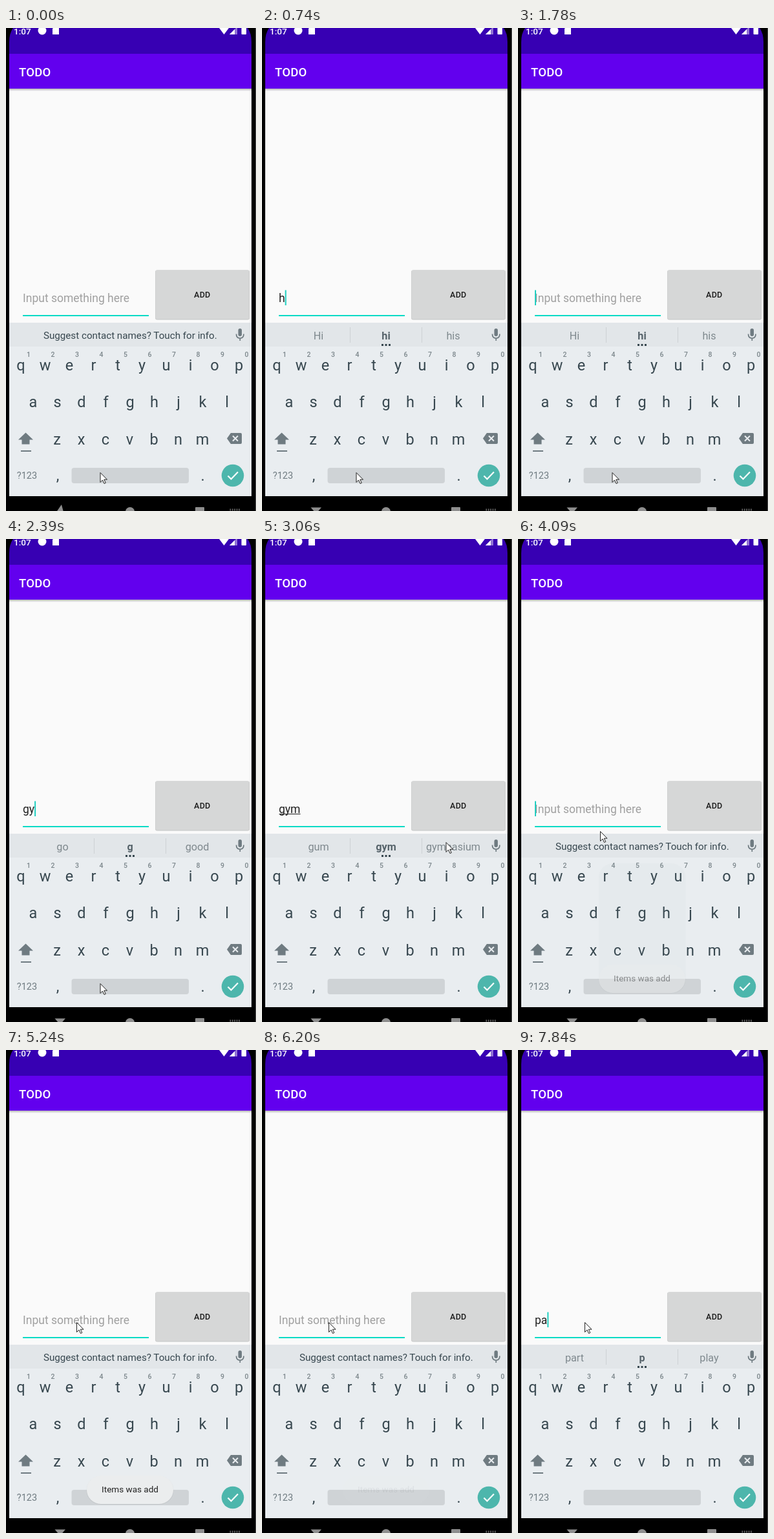
An HTML page for the animation above (7990 ms loop, 387 by 749 pixels).

```html
<!DOCTYPE html>
<html lang="en">
<head>
<meta charset="utf-8">
<title>Todo app</title>
<style>
  html, body { margin: 0; width: 100%; height: 100%; overflow: hidden; background: #000; }
  svg { display: block; width: 100%; height: 100%; font-family: Roboto, sans-serif; }
  text { white-space: pre; }
  .mid { text-anchor: middle; }
  .key { font-size: 23.5px; fill: #37474f; }
  .num { font-size: 10.5px; font-weight: 500; fill: #7b868b; }
  .field { font-size: 17.5px; fill: #212121; }
  .word { font-size: 16.2px; fill: #7f898e; }
  .bold { font-weight: 700; fill: #56636a; }
  .grey { fill: #6f7b81; }
</style>
</head>
<body>
<svg viewBox="0 0 387 749" preserveAspectRatio="none">
  <defs>
    <linearGradient id="shade" x2="0" y2="1">
      <stop offset="0" stop-opacity=".28"/>
      <stop offset="1" stop-opacity="0"/>
    </linearGradient>
    <clipPath id="screen"><path d="M5 727V22Q5 8 11 0H374Q380 8 380 22V727Z"/></clipPath>
  </defs>
  <rect width="387" height="749"/>
  <rect x="386" width="1" height="749" fill="#444"/>

  <g clip-path="url(#screen)">
    <rect x="5" y="94" width="375" height="364" fill="#fafafa"/>
    <rect width="387" height="40" fill="#3700b3"/>
    <rect y="40" width="387" height="54" fill="#6200ee"/>
    <rect y="94" width="387" height="4" fill="url(#shade)"/>
    <rect y="457" width="387" height="37" fill="#e2e6e9"/>
    <rect y="494" width="387" height="232" fill="#e9edf0"/>
  </g>

  <g fill="#fff">
    <text x="12" y="10" font-size="13.5" font-weight="500">1:07</text>
    <circle cx="56" cy="4" r="6.5"/>
    <path d="M72 10V1L75-2H82V10Z"/>
    <path d="M330 0Q338-6 345 0L337.5 10Z"/>
    <path d="M346 10L358-2V10Z" opacity=".45"/>
    <path d="M346 10L354 2V10Z"/>
    <rect x="364.500" y="-2" width="7.500" height="12" rx="1"/>
    <text x="20" y="74.500" font-size="18.500" font-weight="500" letter-spacing=".2">TODO</text>
  </g>

  <rect id="lift" x="231" y="376" width="146" height="79" rx="3" opacity="0"/>
  <rect x="231" y="375.500" width="146" height="77" rx="3" fill="#c6c7c7"/>
  <rect id="button" x="231.500" y="375.500" width="145" height="76" rx="2" fill="#d6d7d7"/>
  <text class="mid" x="303.800" y="418" font-size="12.500" font-weight="500" letter-spacing=".3" fill="#1c1c1c">ADD</text>

  <text id="hint" class="field" x="26" y="425" style="fill:#a0a0a0">Input something here</text>
  <text id="typed" class="field" x="26" y="425"></text>
  <rect id="line" x="26.500" y="426" width="33" height="1" fill="#212121"/>
  <rect x="26" y="445" width="195" height="2" fill="#03dac5"/>
  <rect id="caret" y="406.500" width="2" height="23.500" fill="#1fcfc0"/>

  <text id="contact" class="mid" x="192.300" y="482" font-size="15.200" fill="#37474f">Suggest contact names? Touch for info.</text>
  <g id="words" class="mid">
    <path d="M136.500 464V488M247.500 464V488" stroke="#cdd2d5"/>
    <text class="word" x="87.500" y="483"></text>
    <text class="word bold" x="192" y="483"></text>
    <text class="word" x="296" y="483"></text>
    <path d="M185 491.500H199" stroke="#37474f" stroke-width="3" stroke-dasharray="3 2.500"/>
  </g>
  <g class="grey">
    <rect x="359.500" y="466" width="5.500" height="12" rx="2.750"/>
    <path d="M356.500 474.500Q356.500 481 362.300 481Q368 481 368 474.500M362.300 481V485" fill="none" stroke="#6f7b81" stroke-width="1.700"/>
  </g>

  <g id="keys"></g>
  <g class="grey">
    <path d="M30.500 627.500L42 638.500H36.500V645.500H24.500V638.500H19Z"/>
    <rect x="23" y="655" width="16" height="2"/>
    <path d="M342 636.500L348 628H363Q365 628 365 630V643Q365 645 363 645H348Z"/>
    <path d="M351 632.500L359 640.500M359 632.500L351 640.500" stroke="#e9edf0" stroke-width="2"/>
    <text class="mid" x="32.500" y="699" font-size="14.500">?123</text>
  </g>
  <rect x="101.500" y="682" width="181.500" height="24" rx="4" fill="#cfd3d6"/>
  <circle cx="351" cy="694" r="17.300" fill="#4db6ac"/>
  <path d="M343.500 694.500L348.500 699.500L359 688.500" fill="none" stroke="#fff" stroke-width="2.200"/>

  <g fill="#8e8e8e">
    <path id="back" d="M75.500 743.500H92L83.700 753Z"/>
    <circle cx="192" cy="750" r="7"/>
    <rect x="293" y="743" width="14" height="12" rx="1"/>
    <path d="M346.500 746.500H362M346.500 749H362" stroke="#8e8e8e" stroke-width="1.500" stroke-dasharray="1.700 1.700"/>
  </g>

  <rect id="veil" x="125" y="503" width="134.500" height="201" rx="22" fill="#8095a0" opacity="0"/>
  <g id="toast">
    <rect x="124.500" y="660.500" width="135" height="44.500" rx="22" fill="#000" opacity=".05"/>
    <rect x="125" y="660" width="134" height="44" rx="22" fill="#ebedee"/>
    <text class="mid" x="192" y="686" font-size="13.500" fill="#222">Items was add</text>
  </g>
  <path id="mouse" d="M.5.500V15.500L4 12L6.500 17.500L8.800 16.500L6.300 11.200H11Z" fill="#fff" stroke="#222" stroke-width="1"/>
</svg>
<script>
  const LOOP = 7990;
  const $ = id => document.getElementById(id);

  const row = (letters, x, y) => [...letters].map((c, i) =>
    `<text class="key mid" x="${x + i * 37.5}" y="${y}">${c}</text>`).join('');
  const nums = [...'1234567890'].map((c, i) =>
    `<text class="num mid" x="${35 + i * 37.5}" y="510">${c}</text>`).join('');
  $('keys').innerHTML = row('qwertyuiop', 23, 530.5) + row('asdfghjkl', 42, 588) +
    row('zxcvbnm', 79, 645.5) + row(',', 80, 702) + row('.', 304.5, 702) + nums;

  // Each track is a list of [start, value]; a value holds until the next one.
  const tracks = {
    text: [[0, ''], [150, 'h'], [280, 'hi'], [740, 'h'], [860, ''], [2030, 'g'], [2270, 'gy'],
      [2540, 'gym'], [3850, ''], [4700, ' '], [4820, ''], [7600, 'p'], [7840, 'pa']],
    caret: [[0, 0], [150, 1], [1260, 0], [1780, 1], [3060, 0], [3590, 1], [4330, 0],
      [4700, 1], [5240, 0], [5780, 1], [6200, 0], [6700, 1], [7200, 0], [7600, 1]],
    words: [[0, ''], [420, 'Hi hi his'], [2150, 'go g good'], [2660, 'gum gym gymnasium'],
      [3970, ''], [7720, 'part p play']],
    line: [[0, 0], [600, 15], [740, 0], [2660, 33], [3850, 0]],
    mouse: [[0, '145.5 689'], [3060, '284.5 470'], [3210, '335 405'], [3330, '358 344'],
      [3450, '305 395'], [3970, '215 432'], [4090, '127 453'], [4210, '125.5 422'],
      [5240, '109 422'], [5380, '103 422']],
    press: [[0, 0], [3590, 1], [3710, 0]],
    toast: [[0, 0], [3970, .15], [4090, .45], [4210, .7], [4330, .88], [4450, 1],
      [5930, .6], [6080, .25], [6200, .06], [6700, 0]],
    turn: [[0, 75], [150, 45], [280, 18], [420, 0]]
  };
  const at = (name, t) => tracks[name].findLast(e => e[0] <= t)[1];
  const show = (id, on) => $(id).setAttribute('visibility', on ? 'visible' : 'hidden');
  const set = (id, key, value) => $(id).setAttribute(key, value);
  const slots = $('words').querySelectorAll('text');

  function draw(t) {
    const text = at('text', t), words = at('words', t);
    const line = at('line', t), toast = at('toast', t), press = at('press', t);

    $('typed').textContent = text;
    show('hint', !text);
    set('caret', 'x', 26 + (text ? $('typed').getComputedTextLength() : 0));
    show('caret', at('caret', t));
    set('line', 'width', line);

    show('contact', !words);
    show('words', words);
    words.split(' ').forEach((w, i) => slots[i].textContent = w);

    set('button', 'fill', press ? '#c3c4c4' : '#d6d7d7');
    set('lift', 'opacity', press * .2);
    set('toast', 'opacity', toast);
    set('veil', 'opacity', t < 4450 ? toast * (1 - toast) * .16 : 0);
    set('mouse', 'transform', `translate(${at('mouse', t)})`);
    set('back', 'transform', `rotate(${at('turn', t)} 83.7 748)`);
  }

  let start;
  function tick(now) {
    start ??= now;
    draw((now - start) % LOOP);
    requestAnimationFrame(tick);
  }
  draw(0);
  requestAnimationFrame(tick);
</script>
</body>
</html>
```
